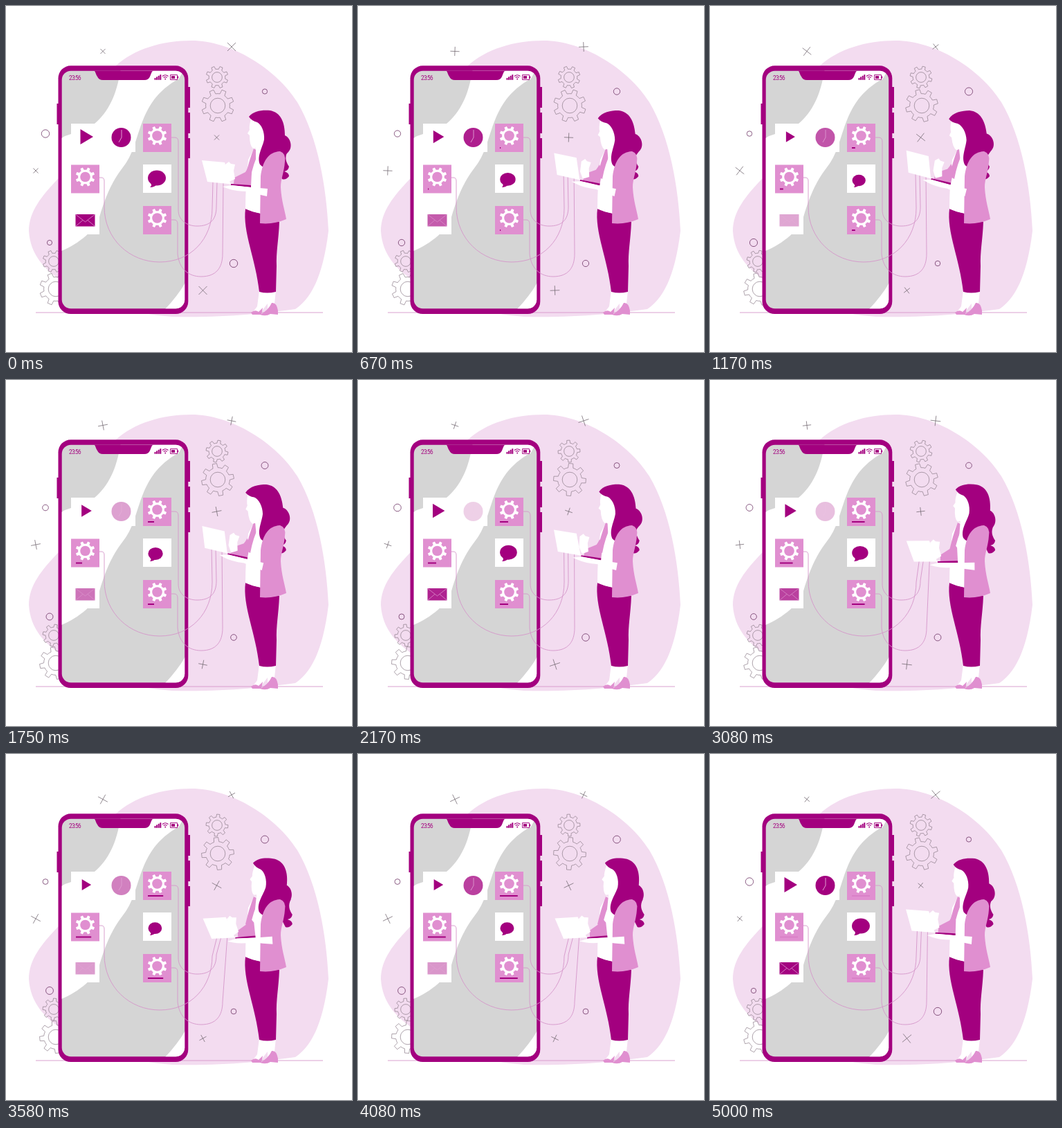
These frames come from a looping animation (500 by 500 pixels, 5.08 s). An HTML page with a canvas:

```html
<!DOCTYPE html>
<html lang="en">
<head>
<meta charset="utf-8">
<title>App development</title>
<style>
html, body { margin: 0; width: 100%; height: 100%; overflow: hidden; background: #fff; }
canvas { display: block; width: 500px; height: 500px; }
</style>
</head>
<body>
<canvas id="stage" width="500" height="500"></canvas>
<script>
const ctx = document.getElementById('stage').getContext('2d');
const LOOP = 5080, STEPS = 61, TAU = Math.PI * 2;
const DARK = '#a3007f', PINK = '#e08fd0', PALE = '#f3dcf0', GREY = '#d5d5d5', WHITE = '#fff';
const WIRE = '#d596ca', LINE = '#8b7b89';

const fill = (d, color) => { ctx.fillStyle = color; ctx.fill(new Path2D(d)); };
const stroke = (d, color, width = 1) => {
  ctx.strokeStyle = color;
  ctx.lineWidth = width;
  ctx.stroke(new Path2D(d));
};
const rect = (x, y, w, h, color) => { ctx.fillStyle = color; ctx.fillRect(x, y, w, h); };
const rounded = (x, y, w, h, r, color) => {
  ctx.beginPath();
  ctx.roundRect(x, y, w, h, r);
  ctx.fillStyle = color;
  ctx.fill();
};
const circle = (x, y, r) => { ctx.beginPath(); ctx.arc(x, y, r, 0, TAU); };
const group = (draw, { x = 0, y = 0, angle = 0, scale = 1, dx = 0, dy = 0, alpha = 1 }) => {
  ctx.save();
  ctx.globalAlpha = alpha;
  ctx.translate(x + dx, y + dy);
  ctx.rotate(angle);
  ctx.scale(scale, scale);
  ctx.translate(-x, -y);
  draw();
  ctx.restore();
};

function gearPath(x, y, r, root, turn = 0) {
  const teeth = 8, pitch = TAU / teeth;
  const profile = [[-.27, root], [-.17, 1], [.17, 1], [.27, root]];
  ctx.beginPath();
  for (let i = 0; i < teeth; i++) {
    const mid = (i + .5) * pitch + turn;
    for (const [offset, k] of profile) {
      const a = mid + offset * pitch;
      ctx.lineTo(x + Math.cos(a) * r * k, y + Math.sin(a) * r * k);
    }
    ctx.arc(x, y, r * root, mid + .27 * pitch, mid + .73 * pitch);
  }
  ctx.closePath();
}

function outlineGear(x, y, r, turn) {
  ctx.strokeStyle = LINE;
  ctx.lineWidth = .7;
  gearPath(x, y, r, .74, turn);
  ctx.stroke();
  circle(x, y, r * .46);
  ctx.stroke();
}

function backdrop(turn, pulse) {
  fill('M268 50C226 50 185 62 158 87C120 160 105 225 74 251C52 274 33 297 33 325' +
    'C35 360 57 382 82 398C130 430 185 445 240 449C310 451 375 444 418 438' +
    'C440 424 458 392 466 325C463 262 451 190 421 139C390 90 325 50 268 50Z', PALE);
  stroke('M43 443H458', WIRE, .9);
  [[305, 103, 16], [69, 369, 16]].forEach(g => outlineGear(...g, turn));
  [[306, 144, 23.5], [72, 409, 23.5]].forEach(g => outlineGear(...g, -turn));

  ctx.strokeStyle = '#756b74';
  ctx.lineWidth = .8;
  const cross = (x, y, arm, angle) => {
    ctx.beginPath();
    for (let i = 0; i < 2; i++) {
      const a = angle + Math.PI / 4 + i * Math.PI / 2;
      const ax = Math.cos(a) * arm, ay = Math.sin(a) * arm;
      ctx.moveTo(x - ax, y - ay);
      ctx.lineTo(x + ax, y + ay);
    }
    ctx.stroke();
  };
  [[140, 65.5], [304.5, 190], [43, 238]].forEach(([x, y]) => cross(x, y, 5 + 3 * pulse, turn));
  [[326, 59], [284.5, 411]].forEach(([x, y]) => cross(x, y, 8.5 - 3 * pulse, -turn));

  ctx.strokeStyle = '#6f3566';
  const ring = (x, y, r) => { circle(x, y, r); ctx.stroke(); };
  [[374, 123.5], [63, 342]].forEach(([x, y]) => ring(x, y, 3.6 + 2 * pulse));
  [[57, 184.5], [329, 372]].forEach(([x, y]) => ring(x, y, 5.7 - 2 * pulse));
}

function statusBar() {
  ctx.fillStyle = DARK;
  ctx.font = "8.2px Roboto, 'Open Sans', sans-serif";
  ctx.letterSpacing = '-0.7px';
  ctx.fillText('23:56', 91, 106.5);
  for (let i = 0; i < 4; i++) rect(214.5 + i * 2.6, 104 - i * 1.6, 2, 2.8 + i * 1.6, DARK);
  stroke('M226 101.5Q230 98 234.5 101.5M227.7 103.5Q230 101.5 232.7 103.5', DARK, 1.1);
  circle(230.2, 105.5, 1);
  ctx.fill();
  stroke('M237.5 99.5H247.5V106.5H237.5Z', DARK, .9);
  rect(239, 101, 5, 4, DARK);
  rect(248, 101.5, 1.2, 3, DARK);
}

function phone() {
  rect(73.5, 141, 5, 30, DARK);
  [[117, 30], [154, 30], [191, 29]].forEach(([y, h]) => rect(261, y, 5, h, DARK));
  rounded(75.5, 86.3, 187.8, 358.7, 18, DARK);
  ctx.save();
  ctx.beginPath();
  ctx.roundRect(80.7, 93.7, 177.5, 343.6, 13);
  ctx.clip();
  rect(80, 93, 179, 345, GREY);
  fill('M166 90C160 128 149 152 128 170L94 185Q86 187 80 191V354C105 344 131 322 135 305' +
    'C146 268 156 250 169 233C198 198 186 140 250 105L258 90Z', WHITE);
  fill('M259 400Q248 419 230 438H259Z', WHITE);
  fill('M126 93C130 94 129 98 132 102Q134 107 140 107H200Q206 107 208 102C210 98 210 94 214 93Z', DARK);
  ctx.restore();
  statusBar();
}

function gearTile(x, y, bar, barAlpha) {
  rect(x, y, 41, 41, PINK);
  ctx.fillStyle = WHITE;
  gearPath(x + 20.5, y + 17.5, 14, .74);
  ctx.fill();
  circle(x + 20.5, y + 17.5, 7.3);
  ctx.fillStyle = PINK;
  ctx.fill();
  group(() => rect(x + 7, y + 34, bar, 2, DARK), { alpha: barAlpha });
}

function apps(time, turn, pulse) {
  [[94, 170], [146, 170], [94, 289], [198, 229]].forEach(([x, y]) => rect(x, y, 41, 41, WHITE));

  const bar = Math.min(26, Math.max(0, (time - 500) * .0072));
  const barAlpha = Math.min(1, Math.max(0, (LOOP - time) / 800));
  [[198, 170], [94, 229.5], [198, 289]].forEach(([x, y]) => gearTile(x, y, bar, barAlpha));

  group(() => fill('M107.5 178L126 189L107.5 200Z', DARK), { x: 115.5, y: 189, scale: 1 - .3 * pulse });

  group(() => {
    circle(166.5, 190, 14);
    ctx.fillStyle = DARK;
    ctx.fill();
    stroke('M167 179V190L163 197', '#f0c8e8', .8);
  }, { alpha: .1 + .9 * ((1 + Math.cos(turn)) / 2) ** .8 });

  group(() => {
    ctx.beginPath();
    ctx.ellipse(218, 248.5, 13, 11, 0, 0, TAU);
    ctx.fillStyle = DARK;
    ctx.fill();
    fill('M208 254Q212 259 208 262Q215 262 219 257Z', DARK);
  }, { x: 207, y: 262, scale: 1 - .26 * pulse });

  group(() => {
    rect(100.5, 301, 28, 17.5, DARK);
    stroke('M101 301.5L114.5 312L128 301.5M101 318L111 309.5M128 318L118 309.5', '#e8b0dd', .7);
  }, { alpha: 1 - .66 * pulse });
}

function wires(sway) {
  const lift = -12 * sway, slide = 2 * (1 - sway) ** 2 - 1;
  const end = (x, y) => `${x + slide} ${y + lift}`;
  stroke(`M239 190H244Q249 190 249 196V295C249 310 262 318 276 318C294 318 304 310 304 290L${end(304, 254)}`, WIRE, .9);
  stroke(`M135 248H138Q142 248 142 253V290C142 337 179 370 222 370C267 370 298 337 298 292L${end(298, 254)}`, WIRE, .9);
  stroke(`M239 309H243Q248 309 248 315V358C250 380 264 391 282 391C304 391 313 378 313 358L${end(313, 254)}`, WIRE, .9);
}

function legs() {
  fill('M366 411L363 434L357 442L367 444L378 430L378 446L388 430L390 411Z', WHITE);
  fill('M354 443Q360 438 365 442L371 436L369 446H356Z', PINK);
  fill('M367 446Q379 440 384 429Q391 428 393 440L393 446L382 445Q376 449 367 446Z', PINK);
  fill('M346 293Q356 298 369 300L395 312C394 338 390 356 391 376L390 413Q377 416 366 413' +
    'C363 388 358 370 353 350C347 326 344 309 346 293Z', DARK);
}

function head() {
  fill('M354 163Q351 174 352 179L349 184L352 187Q352 202 357 206L361 205V226H380L378 165Z', WHITE);
  fill('M351 160C358 151 371 150 382 151C397 154 403 168 403 187C411 190 415 204 408 211' +
    'C401 217 398 226 388 230C381 235 373 236 367 229C362 217 371 204 373 193' +
    'C374 182 369 171 363 168Q355 166 351 160Z', DARK);
}

function laptop(sway) {
  fill('M350 232Q348 237 346 240L330 248L329 257L354 261L355 240Z', PINK);
  fill('M283 223L316 226L324 256L331 258L291 254Z', WHITE);
  const reach = 9 * Math.max(0, sway);
  group(() => fill('M317 229L322 225L325 228L331 229L329 238L331 250L322 254L317 244Z', WHITE), { dx: reach, dy: reach / 5 });
  fill('M325 257L354 259V262L325 259Z', DARK);
  fill('M313 261L327 259L354 262L378 264L377 275Q362 272 350 268Q332 268 321 264Z', WHITE);
}

function woman(sway) {
  group(() => fill('M392 200L407 210C402 219 405 226 409 232Q408 238 402 239Q409 241 409 246' +
    'Q404 252 399 250L390 232Z', DARK), { dx: -5 * sway });
  legs();
  fill('M359 205L350 222Q346 260 346 293Q357 298 369 300L380 225Z', WHITE);
  fill('M358 206L366 210Q357 228 353 250L346 246Q351 224 358 206Z', PINK);
  group(head, { x: 378, y: 215, angle: -.11 * sway });
  fill('M368 246C371 224 379 211 396 210Q405 213 403 225C402 240 397 250 397 262' +
    'C398 282 403 295 405 308Q387 316 367 314Z', PINK);
  group(() => laptop(sway), { x: 376, y: 264, angle: .16 * sway, dx: -7 * sway });
}

function draw(time) {
  const turn = time / LOOP * TAU;
  const pulse = (1 - Math.cos(2 * turn)) / 2;
  const sway = Math.sin(turn);
  rect(0, 0, 500, 500, WHITE);
  backdrop(turn, pulse);
  phone();
  apps(time, turn, pulse);
  wires(sway);
  woman(sway);
}

const start = performance.now();
function tick() {
  const step = Math.floor((performance.now() - start) % LOOP * STEPS / LOOP + .1) % STEPS;
  draw(step * LOOP / STEPS);
  requestAnimationFrame(tick);
}
tick();
</script>
</body>
</html>
```
